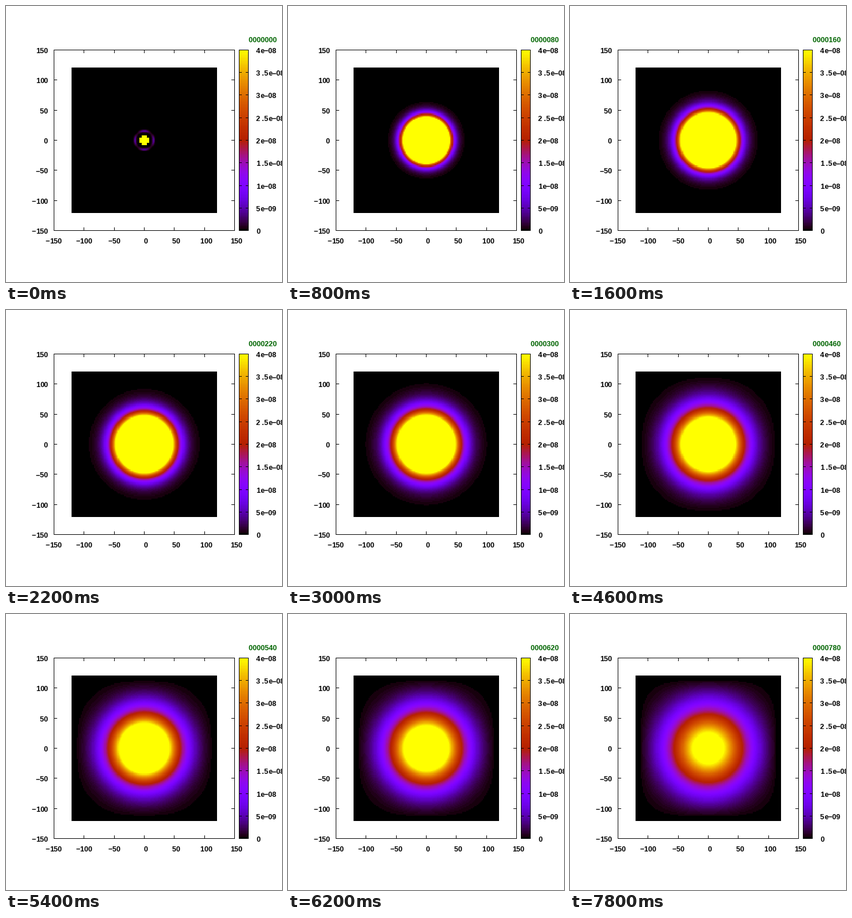
Recreate the animation shown at these times as a matplotlib script. Size 480x480 px, loop 8 s.

```python
import numpy as np
import matplotlib.pyplot as plt
from matplotlib.animation import FuncAnimation

SIZE, FRAMES, STEP = 480, 40, 20
LEFT, RIGHT, TOP, BOTTOM = 83, 397, 76, 390
BAR_L, BAR_R = 405, 421
CX, CY = 240, 233
SCALE = (RIGHT - LEFT) / 300
HALF = 126          # half width of the field in pixels
CELL = 2            # grid spacing in plot units
WALL = 114.5        # where the density falls to zero
LEVELS = 128
PITCH = 7           # fixed character advance

# log of the central density (in units of the scale maximum) over log time
TIMES = [20, 40, 80, 160, 300, 460, 620, 780]
PEAKS = [4.18, 3.49, 2.843, 2.177, 1.408, 0.880, 0.446, 0.186]
peak_fit = np.polyfit(np.log(TIMES), PEAKS, 4)


def palette(v):
    """Black-violet-red-yellow ramp in discrete levels."""
    g = np.clip(np.floor(v * LEVELS), 0, LEVELS - 1) / (LEVELS - 1)
    rgb = np.stack([np.sqrt(g), g ** 3, np.sin(2 * np.pi * g)], axis=-1)
    return np.round(np.clip(rgb, 0, 1) * 255).astype(np.uint8)


pix = np.arange(-HALF, HALF + 1)
axis = CELL * np.floor(pix / SCALE / CELL) + CELL / 2
X, Y = np.meshgrid(axis, axis)
R, ANGLE = np.hypot(X, Y), np.arctan2(Y, X)


def start_field():
    ax_, ay_ = np.abs(X), np.abs(Y)
    cross = (np.minimum(ax_, ay_) < 4) & (np.maximum(ax_, ay_) < 8)
    ring = (0.07 + 0.045 * np.cos(4 * ANGLE)) * np.exp(-((R - 15.5) / 2) ** 2)
    return np.where(cross, 1.0, ring)


def spread_field(t):
    """Diffusing spot between absorbing walls, by mirror images."""
    s = 4.3 * t + 370 * (1 - np.exp(-t / 110))
    line = sum((-1) ** n * np.exp(-(axis - 2 * WALL * n) ** 2 / s)
               for n in (-1, 0, 1))
    line = np.where(np.abs(axis) < WALL, np.maximum(line, 0), 0)
    return np.exp(np.polyval(peak_fit, np.log(t))) * np.outer(line, line)


def frame_box(img, x0, x1, y0, y1):
    img[[y0, y1], x0:x1 + 1] = 0
    img[y0:y1 + 1, [x0, x1]] = 0


def make_base():
    img = np.full((SIZE, SIZE, 3), 255, np.uint8)
    rows = np.arange(TOP, BOTTOM + 1)
    ramp = palette((BOTTOM - rows) / (BOTTOM - TOP))
    img[TOP:BOTTOM + 1, BAR_L:BAR_R + 1] = ramp[:, None]
    frame_box(img, LEFT, RIGHT, TOP, BOTTOM)
    frame_box(img, BAR_L, BAR_R, TOP, BOTTOM)
    for v in range(-150, 151, 50):
        x, y = round(CX + v * SCALE), round(CY - v * SCALE)
        img[TOP:TOP + 6, x] = img[BOTTOM - 5:BOTTOM + 1, x] = 0
        img[y, LEFT:LEFT + 6] = img[y, RIGHT - 5:RIGHT + 1] = 0
    for k in range(9):
        y = round(BOTTOM - k * (BOTTOM - TOP) / 8)
        img[y, BAR_L:BAR_L + 5] = img[y, BAR_R - 4:BAR_R + 1] = 0
    return img


fig = plt.figure(figsize=(SIZE / 100, SIZE / 100), dpi=100, facecolor="white")
ax = fig.add_axes([0, 0, 1, 1])
ax.axis("off")
base = make_base()
picture = ax.imshow(base, interpolation="nearest", aspect="auto")
ax.set_xlim(-0.5, SIZE - 0.5)
ax.set_ylim(SIZE - 0.5, -0.5)


def put(text, x, y, color="black"):
    """Fixed-pitch text whose first cell starts at x, centred on y."""
    return [ax.text(x + PITCH * (i + 0.5) - 0.5, y + 4.5,
                    c.replace("-", "\u2212"), color=color, ha="center",
                    va="baseline", family="Liberation Sans",
                    weight="bold", size=9)
            for i, c in enumerate(text) if c != " "]


for v in range(-150, 151, 50):
    label = f"{v: d}"
    put(label, CX + v * SCALE - PITCH * len(label) / 2, 408)
    put(label, 73 - PITCH * len(label), CY - v * SCALE + 1)
for k in range(9):
    label = f"{k * 0.5:g}e-08" if k > 1 else ("0", "5e-09")[k]
    put(label, 435, BOTTOM - k * (BOTTOM - TOP) / 8 + 1)
counter = put("0" * 7, 421.5, 58, "#006400")


def draw(i):
    t = i * STEP
    field = spread_field(t) if i else start_field()
    img = base.copy()
    img[CY - HALF:CY + HALF + 1, CX - HALF:CX + HALF + 1] = palette(field)
    picture.set_data(img)
    for glyph, c in zip(counter, f"{t:07d}"):
        glyph.set_text(c)
    return [picture, *counter]


anim = FuncAnimation(fig, draw, frames=FRAMES, interval=200, repeat=True,
                     repeat_delay=0, blit=False)
plt.show()
```
